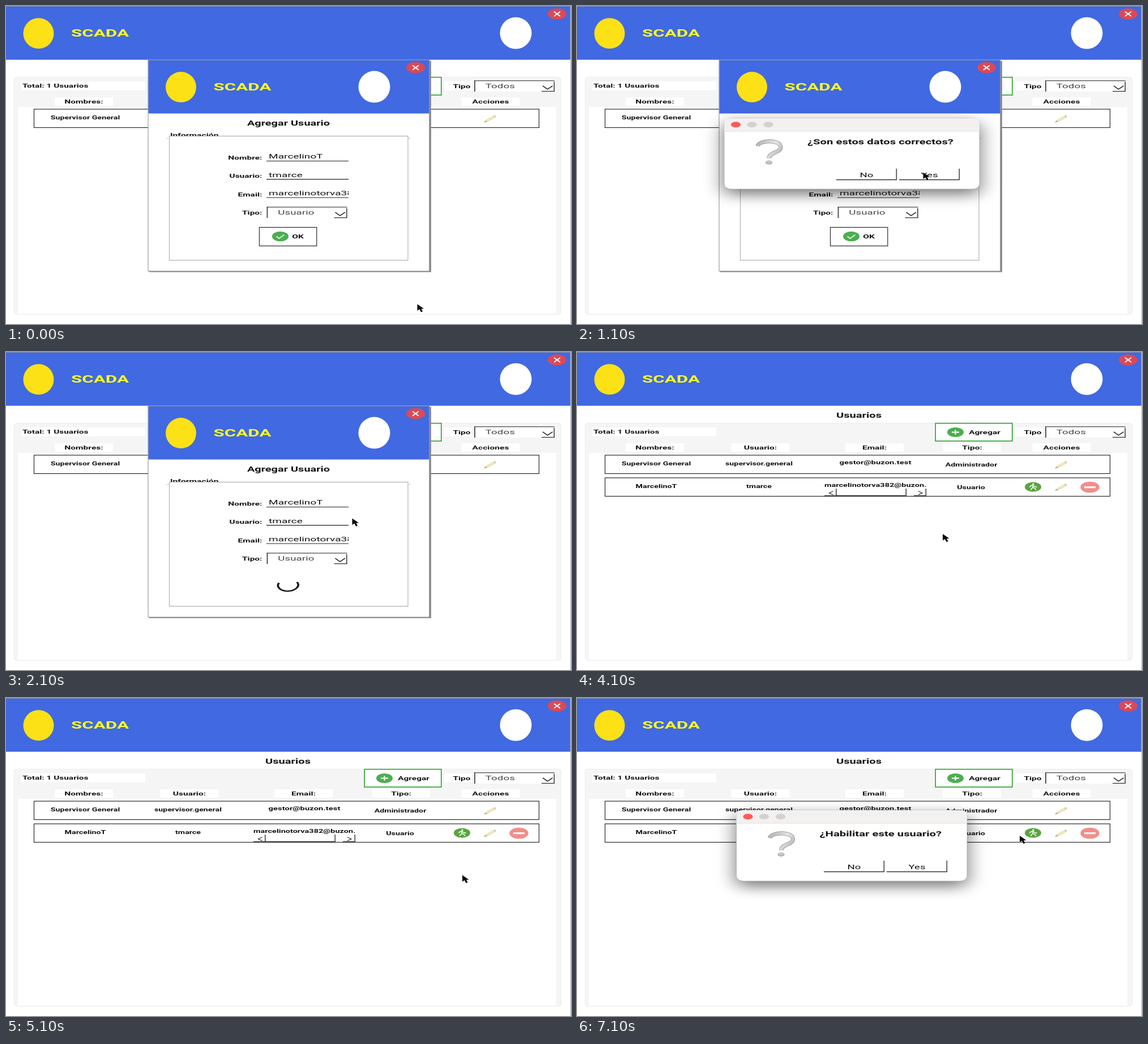
An HTML page for the animation above (8 s loop, 998x561 px).

```html
<!DOCTYPE html>
<html lang="es">
<head>
<meta charset="utf-8">
<title>SCADA</title>
<style>
html, body { margin: 0; width: 100%; height: 100%; overflow: hidden; background: #fff; }
svg { display: block; width: 998px; height: 561px; font-family: Roboto, sans-serif; }
</style>
</head>
<body>
<svg id="stage" viewBox="0 0 998 561" xmlns="http://www.w3.org/2000/svg"></svg>
<script>
const WIDE = 1.65; // the whole screen is shown wider than it was drawn
const LOOP = 8000;

const text = (x, y, str, size, o = {}) =>
  `<text transform="translate(${x} ${y}) scale(${WIDE} 1)" font-size="${size}" font-weight="${o.weight || 700}"
    text-anchor="${o.anchor || 'middle'}" fill="${o.fill || '#111'}">${str}</text>`;
const rect = (x, y, w, h, fill, more = '') =>
  `<rect x="${x}" y="${y}" width="${w}" height="${h}" fill="${fill}" ${more}/>`;
const line = (d, stroke = '#222', w = 1, more = '') =>
  `<path d="${d}" fill="none" stroke="${stroke}" stroke-width="${w}" ${more}/>`;
const oval = (x, y, rx, ry, fill) => `<ellipse cx="${x}" cy="${y}" rx="${rx}" ry="${ry}" fill="${fill}"/>`;
const group = (id, body, x = 0, y = 0) => `<g id="${id}" transform="translate(${x} ${y})">${body}</g>`;
const outline = 'stroke="#2a2a2a" stroke-width="1.2"';

// raised edge: dark line below and on the right
const raised = (x, y, w, h) =>
  line(`M${x} ${y + h - .5}H${x + w}`, '#333', 1.3) + line(`M${x + w - .7} ${y}V${y + h}`, '#444', 1.6);

const closeButton = (x, y) =>
  oval(x, y, 16.5, 9.7, '#dc4956') + line(`M${x - 5.5} ${y - 4}l11 8m0 -8l-11 8`, '#fff', 1.9);

const header = w =>
  rect(0, 0, w, 94, '#4169e1') +
  '<circle cx="57.5" cy="47.5" r="27" fill="#fbe116"/>' +
  text(115, 53.5, 'SCADA', 19, { anchor: 'start', fill: '#ffff1e' }) +
  `<circle cx="${w - 97}" cy="47" r="28" fill="#fff"/>` +
  closeButton(w - 24, 13.1);

const select = (x, y, label) =>
  rect(x, y, 142, 20, '#fff') +
  line(`M${x} ${y + .7}h142`, '#666', 1.4) + line(`M${x + 1} ${y}v20`, '#555', 2) +
  line(`M${x + 141.3} ${y}v20`, '#999', 1) +
  text(x + 19.8, y + 13.5, label, 11.4, { weight: 400, anchor: 'start', fill: '#444' }) +
  raised(x + 119, y + 3, 23, 17) +
  line(`M${x + 121} ${y + 9.8}l8.5 6l9 -6`, '#222', 1.5);

const pencil = (x, y) =>
  line(`M${x - 7} ${y + 4}L${x + 8} ${y - 4}`, '#d8cb93', 4.2) +
  line(`M${x - 6.5} ${y + 3.6}L${x + 7} ${y - 3.6}`, '#f5e9b6', 2.8) +
  line(`M${x + 7} ${y - 3.6}l3 -1.6`, '#dfc9b8', 3.6) +
  line(`M${x - 10} ${y + 5.8}l3.4 -1.8`, '#9a8c66', 1.5);

const walker = (x, y) =>
  oval(x, y, 14.5, 8.6, '#58a63d') + oval(x + .5, y - 5, 1.8, 1.2, '#fff') +
  line(`M${x} ${y - 3}l-.5 4l-4 4.5M${x - .5} ${y + 1}l4 1.5l2 3M${x - 6} ${y + .5}l2 -2.5l4 -1l3 2.5l4 .8`, '#fff', 1.5);

const row = y => rect(49.5, y, 892, 32.5, '#fff', outline);

function mainScreen() {
  const heads = [['Nombres:', 137.5], ['Usuario:', 324], ['Email:', 525.5], ['Tipo:', 698], ['Acciones', 856]];
  return rect(0, 0, 998, 561, '#fff') + group('top', header(997.5), 0, .8) +
    line('M0 .5H998', '#8d93a5') + line('M997.3 0V561', '#bbb', 1.2) +
    text(498, 115.5, 'Usuarios', 12.2) +
    rect(14.5, 125.5, 966, 418.5, '#f5f5f5', 'rx="5" stroke="#ececec"') +
    rect(21, 178, 951, 365, '#fff') + rect(27, 133, 219, 15.5, '#fff') +
    text(29, 143.5, 'Total: 1 Usuarios', 9.36, { anchor: 'start' }) +
    rect(633.2, 125.7, 135.6, 31.4, '#fff', 'stroke="#26a02b" stroke-width="1.6"') +
    oval(668.5, 141.5, 14.5, 8.6, '#4bae50') + line('M662 141.5h13M668.5 137.5v8', '#fff', 2.2) +
    text(720, 145, 'Agregar', 9.35) +
    rect(774, 133, 49, 16, '#fff') + text(805, 145, 'Tipo', 9.4) + select(827, 131, 'Todos') +
    heads.map(([s, x]) => rect(x - 51.5, 161, 103, 15, '#fff') + text(x, 171.5, s, 9.45)).join('') +
    row(182) + text(140, 200, 'Supervisor General', 8.65) + text(321.5, 200, 'supervisor.general', 8.65) +
    text(527, 198, 'gestor@buzon.test', 9) + text(696.5, 201.5, 'Administrador', 8.65) + pencil(855, 199);
}

const newRow = () =>
  row(222) + text(140, 240, 'MarcelinoT', 8.65) + text(321.5, 240, 'tmarce', 8.65) +
  `<g clip-path="url(#mail)">${text(437, 237.5, 'marcelinotorva382@buzon.te', 8.8, { anchor: 'start' })}</g>` +
  raised(437, 241, 21.5, 13) + raised(458, 241, 124, 13) + raised(595, 241, 22, 13) +
  line('M452.5 245.5l-7 3.2l7 3.2M603 245.5l7 3.2l-7 3.2', '#333', 1.2) +
  text(696, 241.5, 'Usuario', 8.7) + walker(805.5, 238) + pencil(855, 238.5) +
  oval(906, 238.5, 16.7, 9.8, '#f28e8b') + rect(896, 237, 20, 3.2, '#fff');

function form() {
  const field = (y, label, value) =>
    text(452.5, y, label, 9.4, { anchor: 'end' }) +
    `<g clip-path="url(#entry)">${text(464, y - 1.6, value, 11.6, { weight: 400, anchor: 'start' })}</g>` +
    line(`M460 ${y + 2.5}H605`, '#222', 1.2);
  return rect(253, 97, 498, 372.5, '#8c8c8c') + rect(251, 95.3, 496.8, 372.5, '#fff', 'stroke="#8a8a8a"') +
    group('formTop', header(496), 251.5, 95.6) +
    text(499, 210.5, 'Agregar Usuario', 12.1) +
    text(290, 231, 'Información', 9.5, { anchor: 'start' }) +
    line('M283 233.5H715', '#ccc') + rect(288.5, 229.5, 421.5, 219, '#fff', 'stroke="#a5a5a5"') +
    field(271, 'Nombre:', 'MarcelinoT') + field(303.2, 'Usuario:', 'tmarce') +
    field(335.5, 'Email:', 'marcelinotorva382') +
    text(452.5, 368, 'Tipo:', 9.4, { anchor: 'end' }) + select(460.5, 354, 'Usuario') +
    group('caret', line('M544.5 323V336', '#111', 1.2)) +
    group('ok', rect(447.5, 390.5, 101.3, 32.8, '#fff', outline) + oval(484.5, 406.5, 14.5, 8.7, '#4bae50') +
      line('M477.5 406.5l5 3.6l9 -6.6', '#d9f2d6', 2) + text(515.5, 410.2, 'OK', 9.5)) +
    `<g id="spin"><g transform="translate(498.3 411.3) scale(${WIDE} 1)">
      <path id="arc" d="M-11 0A11 10.3 0 1 1 6.5 8.3" fill="none" stroke="#1c1c1c" stroke-width="2.3"/></g></g>`;
}

// question box, placed by its left edge and width
function ask(id, x, w, question) {
  const mark = 'M-21 -13C-19 -24 21 -25 20 -10C19 -1 -1 -2 -1 9';
  const button = (bx, s) => raised(bx, 89, 107, 20) + text(bx + 53.5, 103.5, s, 11.3, { weight: 400 });
  return group(id,
    `<rect width="${w}" height="125" rx="12" ry="9" fill="#000" opacity=".55" transform="translate(0 9)" filter="url(#blur)"/>` +
    rect(0, 0, w, 125, '#fff', 'rx="12" ry="9" stroke="#aaa" stroke-width=".8"') +
    `<path d="M0 23V9Q0 0 12 0H${w - 12}Q${w} 0 ${w} 9V23Z" fill="#f3f0f0"/>` + line(`M0 23H${w}`, '#e2dfdf') +
    [['#fc5b57', 20.5], ['#d4d1d1', 49], ['#d4d1d1', 78]].map(([c, cx]) => oval(cx, 11.3, 8.6, 5, c)).join('') +
    `<g transform="translate(80 62)">${line(mark, '#8e8e8e', 7)}${line(mark, 'url(#steel)', 5.6)}` +
    oval(-1, 16, 6, 3.6, '#999') + oval(-1, 15.6, 5, 2.8, '#c6c6c6') + '</g>' +
    text(147, 45.5, question, 12.3, { anchor: 'start' }) +
    button(w - 253, 'No') + button(w - 142, 'Yes'), x, 198);
}

document.getElementById('stage').innerHTML = `<defs>
  <clipPath id="mail"><rect x="437" y="226" width="180" height="15"/></clipPath>
  <clipPath id="entry"><rect x="460" y="250" width="145" height="95"/></clipPath>
  <filter id="blur" x="-30%" y="-60%" width="160%" height="220%"><feGaussianBlur stdDeviation="18 12"/></filter>
  <linearGradient id="steel" gradientUnits="userSpaceOnUse" x1="-20" y1="-20" x2="20" y2="10">
    <stop stop-color="#b4b4b4"/><stop offset=".5" stop-color="#e6e6e6"/><stop offset="1" stop-color="#a8a8a8"/>
  </linearGradient></defs>` +
  mainScreen() + group('added', newRow()) + group('form', form()) +
  ask('confirm', 260, 451, '¿Son estos datos correctos?') +
  ask('enable', 281.5, 407.5, '¿Habilitar este usuario?') +
  `<path id="cursor" d="M0 0V11.4L3.8 9L6.6 14L9.6 13L7 8.3L11.6 8Z" fill="#0a0a0a" stroke="#fff" stroke-width=".8" paint-order="stroke"/>`;

const steps = [
  { at: 0, x: 726.5, y: 526, show: 'form ok' },
  { at: 100, x: 505, y: 411, show: 'form ok' },
  { at: 1100, x: 611.5, y: 293.5, show: 'form ok confirm' },
  { at: 2100, x: 611.5, y: 293.5, show: 'form spin', turn: 150 },
  { at: 3100, x: 597, y: 305, show: 'form spin caret', turn: 0 },
  { at: 4100, x: 646, y: 321, show: 'added' },
  { at: 5100, x: 806, y: 312.5, show: 'added' },
  { at: 6100, x: 811, y: 238, show: 'added' },
  { at: 7100, x: 782, y: 243, show: 'added enable' }
];
const layers = ['form', 'ok', 'spin', 'caret', 'added', 'confirm', 'enable'];
const el = id => document.getElementById(id);

function draw(ms) {
  const t = ms % LOOP;
  const s = steps.filter(k => k.at <= t).pop();
  const on = s.show.split(' ');
  layers.forEach(id => el(id).style.display = on.includes(id) ? '' : 'none');
  el('arc').setAttribute('transform', `rotate(${s.turn || 0})`);
  el('cursor').setAttribute('transform', `translate(${s.x} ${s.y})`);
}

const start = performance.now();
function tick() {
  draw(performance.now() - start);
  requestAnimationFrame(tick);
}
tick();
</script>
</body>
</html>
```
